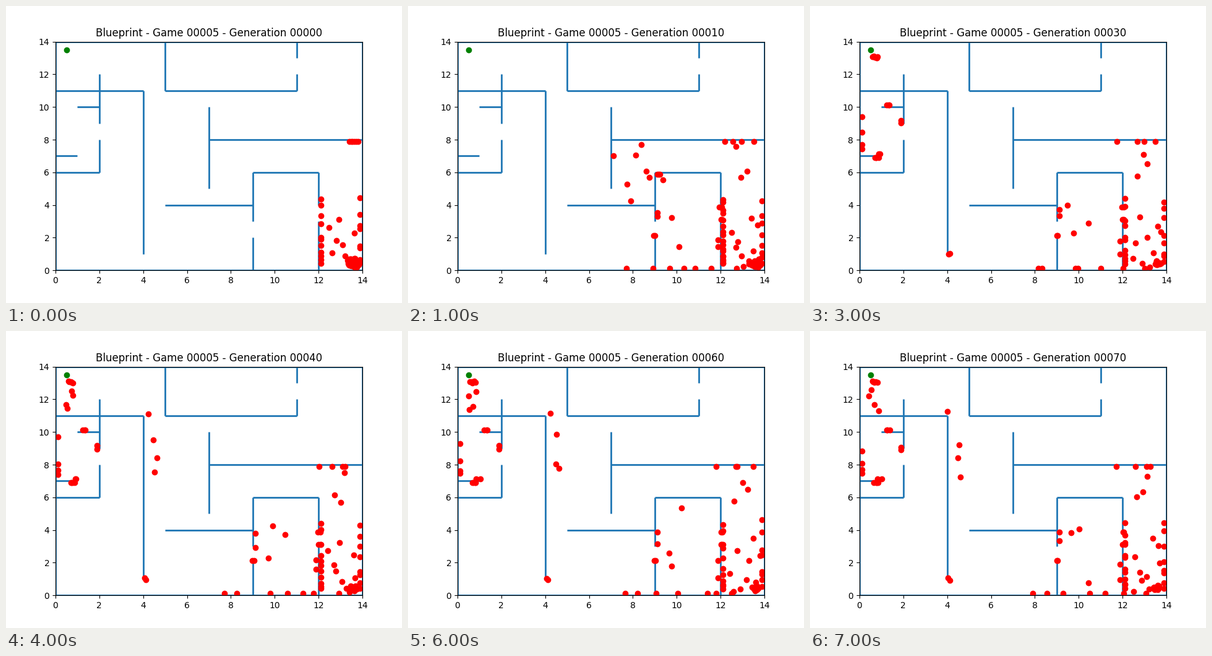
Animation of 640x480 px, one loop 8000 ms. Source, as a matplotlib script:

```python
import numpy as np
import matplotlib.pyplot as plt
from matplotlib.animation import FuncAnimation

SIZE = 14
COUNT = 8       # generations shown
STEP = 10       # generations between two pictures
GAP = 0.11      # dots stop this far from a wall

WALLS = [
    [(0, 0), (0, SIZE), (SIZE, SIZE), (SIZE, 0), (0, 0)],
    [(0, 11), (4, 11), (4, 1)],
    [(2, 12), (2, 9)],
    [(1, 10), (2, 10)],
    [(0, 6), (2, 6), (2, 8)],
    [(0, 7), (1, 7)],
    [(5, 14), (5, 11), (11, 11), (11, 12)],
    [(11, 13), (11, 14)],
    [(7, 10), (7, 5)],
    [(7, 8), (14, 8)],
    [(5, 4), (9, 4)],
    [(9, 3), (9, 6), (12, 6), (12, 4)],
    [(12, 3), (12, 0)],
    [(9, 2), (9, 0)],
]


def generation(g):
    """Final places of one population: it spreads from the lower right
    corner through the maze and gathers at walls and near the goal."""
    rng = np.random.default_rng(g)
    dots = []

    def spread(n, span, skew=1):
        """n jittered values over a span; skew > 1 crowds the low end."""
        lo, hi = span if isinstance(span, tuple) else (span, span)
        t = (rng.permutation(n) + rng.random(n)) / n
        return lo + (hi - lo) * t ** skew

    def scatter(n, x, y, skew=1):
        dots.extend(zip(spread(n, x), spread(n, y, skew)))

    def corner(n, x, y, radius):
        r = radius * np.sqrt(rng.random(n))
        a = rng.uniform(0, 2 * np.pi, n)
        dots.extend(zip(np.minimum(x + r * np.cos(a), SIZE - GAP),
                        np.maximum(y + r * np.sin(a), GAP)))

    roaming = 0 < g < 3
    settled = g >= 3

    # Starting room
    corner(max(34 - 9 * g, 13), 13.58, 0.45, 0.3 if g < 3 else 0.18)
    scatter(18 if roaming else 11, 12 + GAP, (0.4, 4.7), 1.7)
    scatter(8, SIZE - GAP, (0.4, 4.8), 1.5)
    scatter(9, (12.4, 13.8), (0.2, 3.6), 1.4)
    if g == 0:
        scatter(6, (13.4, 13.8), 8 - GAP)
    else:
        scatter(4, (11.7, 13.7), 8 - GAP)
        scatter(3, (12.6, 13.3), (5.3, 7.6))

    # Doors and the middle rooms
    if g > 0:
        scatter(2, (11.97, 12.1), 3 + GAP)
        scatter(2, (11.95, 12.1), 4 - GAP)
        scatter(2, 12 - GAP, (0.9, 2.3))
        scatter(7, (7.4, 13.1), GAP)
        scatter(2, (8.95, 9.07), 2 + GAP)
        scatter(2, 9 + GAP, (2.9, 4))
        scatter(3, (9.3, 10.5), (0.7, 5.6))
    if roaming:
        scatter(1, 7 + GAP, (5.2, 7.5))
        scatter(6, (7.7, 8.9), (4.2, 7.9))
        scatter(3, (9.1, 9.3), 6 - GAP)

    # Long way round to the goal
    if g == 2:
        scatter(4, (0.1, 4.1), (2.5, 11.8))
    if g >= 2:
        scatter(5, (0.55, 0.85), (13, 13.12))
    if settled:
        scatter(2, (4.04, 4.13), (0.92, 1.1))
        scatter(4, (0.65, 0.87), 7 - GAP)
        scatter(2, (0.8, 1.05), 7 + GAP)
        scatter(3, (1.2, 1.4), 10 + GAP)
        scatter(2, 2 - GAP, (8.9, 9.2))
        scatter(4, GAP, (7.4, 9.8), 2)
    if g >= 4:
        scatter(3, (4.45, 4.63), (6.9, 10))
        scatter(1, (4, 4.25), (11.1, 11.3))
        scatter(4, (0.4, 0.9), (11.2, 12.6))
    return dots


generations = [generation(g) for g in range(COUNT)]

fig, ax = plt.subplots(figsize=(6.4, 4.8), dpi=100)
ax.set_xlim(0, SIZE)
ax.set_ylim(0, SIZE)

for wall in WALLS:
    for ends in zip(wall, wall[1:]):
        ax.plot(*zip(*ends), color="C0", lw=2, solid_capstyle="butt")

ax.plot(0.5, 13.5, "o", color="green")
dots, = ax.plot([], [], "o", color="red")
title = ax.set_title("")


def draw(i):
    dots.set_data(*zip(*generations[i]))
    title.set_text(f"Blueprint - Game 00005 - Generation {i * STEP:05d}")
    return dots, title


anim = FuncAnimation(fig, draw, frames=COUNT, interval=1000,
                     repeat=True, repeat_delay=0)
plt.show()
```
